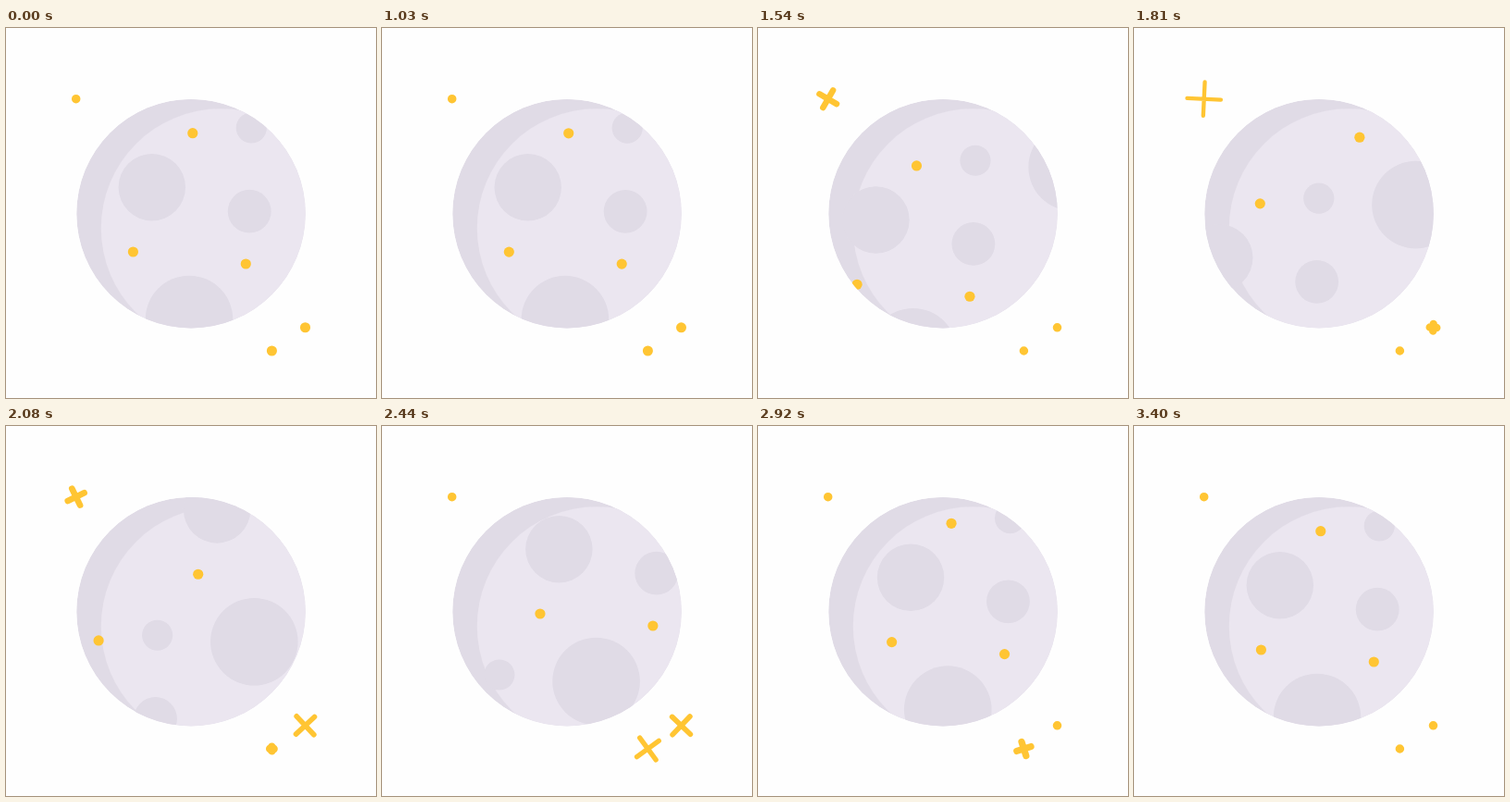
Animation, 400 px wide and 400 px high, one loop 3430 ms. Source, as an HTML page:

```html
<!DOCTYPE html>
<html lang="en">
<head>
<meta charset="utf-8">
<title>Moon</title>
<style>
  html, body { margin: 0; width: 100%; height: 100%; overflow: hidden; background: #fefefe; }
  svg { display: block; width: 100%; height: 100%; }
  .shade { fill: #e0dbe6; }
  .light { fill: #ebe6f0; }
  .spark { fill: #ffc533; }
  .star { stroke: #ffc533; stroke-linecap: round; fill: none; }
</style>
</head>
<body>
<svg viewBox="0 0 400 400">
  <defs>
    <clipPath id="disc"><circle cx="200" cy="200.7" r="123.8"/></clipPath>
    <g id="tile">
      <g class="shade">
        <circle cx="157.8" cy="172.2" r="36.2"/>
        <circle cx="263.2" cy="198.2" r="23.4"/>
        <circle cx="265.3" cy="108" r="16.6"/>
        <circle cx="198" cy="315" r="47.3"/>
      </g>
      <g class="spark">
        <circle cx="201.8" cy="113.7" r="5.6"/>
        <circle cx="137.4" cy="242" r="5.6"/>
        <circle cx="259.3" cy="255" r="5.6"/>
      </g>
    </g>
  </defs>
  <g clip-path="url(#disc)">
    <circle class="shade" cx="200" cy="200.7" r="123.8"/>
    <circle class="light" cx="232" cy="216.5" r="129.2"/>
    <g id="surface">
      <use href="#tile"/>
      <use href="#tile" x="172" y="-200"/>
    </g>
  </g>
</svg>
<script>
  const LOOP = 3430, START = 1000, SPAN = 2400;
  const svg = document.querySelector('svg');
  const surface = document.getElementById('surface');

  const clamp = v => Math.min(1, Math.max(0, v));
  const smooth = v => v * v * (3 - 2 * v);

  // cubic-bezier(x1, 0, x2, 1)
  function bezier(x1, x2, x) {
    let lo = 0, hi = 1;
    for (let i = 0; i < 24; i++) {
      const s = (lo + hi) / 2, r = 1 - s;
      if (3 * r * r * s * x1 + 3 * r * s * s * x2 + s * s * s < x) lo = s;
      else hi = s;
    }
    return smooth(lo);
  }

  const stars = [
    { x: 75.7, y: 76.7, peak: 1800, extra: 0 },
    { x: 323.5, y: 323.8, peak: 2260, extra: 1.6 },
    { x: 287.4, y: 349, peak: 2590, extra: 1.6 }
  ];
  for (const star of stars) {
    star.el = document.createElementNS('http://www.w3.org/2000/svg', 'path');
    star.el.setAttribute('class', 'star');
    svg.append(star.el);
  }

  function drawStar(star, t) {
    const dt = t - star.peak;
    const open = clamp(1 - Math.abs(dt) / 600);
    const grow = (open + smooth(open)) / 2;
    const arm = Math.max(0.01, 18.4 * grow);
    const turn = 180 * smooth(clamp(0.5 + dt / 1080)) - 90;
    const settle = 1 - clamp((t - START) / 500);
    star.el.setAttribute('d', `M${-arm} 0H${arm}M0 ${-arm}V${arm}`);
    star.el.setAttribute('stroke-width', 9.5 - 5.2 * grow + star.extra * settle);
    star.el.setAttribute('transform', `translate(${star.x} ${star.y}) rotate(${turn})`);
  }

  function draw(now) {
    const t = now % LOOP;
    const p = bezier(0.333, 0.4, clamp((t - START) / SPAN));
    surface.setAttribute('transform', `translate(${-172 * p} ${200 * p})`);
    for (const star of stars) drawStar(star, t);
  }

  const begin = performance.now();
  function tick() {
    draw(performance.now() - begin);
    requestAnimationFrame(tick);
  }
  tick();
</script>
</body>
</html>
```
